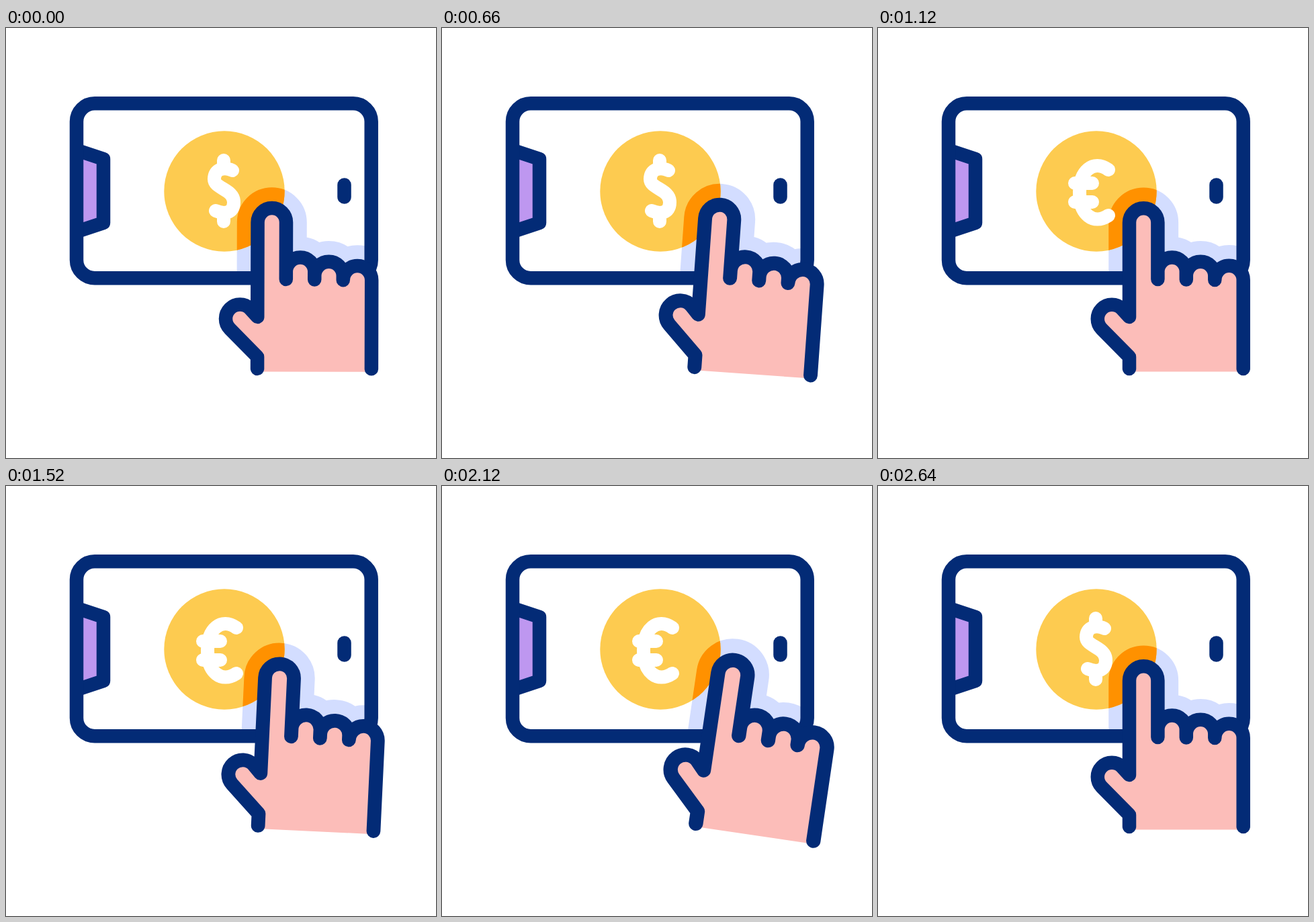
An HTML page for the animation above (3.62 s loop, 640x640 px).

```html
<!DOCTYPE html>
<html lang="en">
<head>
<meta charset="utf-8">
<title>Currency swipe</title>
<style>
  html, body { margin: 0; width: 100%; height: 100%; overflow: hidden; background: #fff; }
  svg { display: block; width: 100vw; height: 100vh; }
  .line { fill: none; stroke: #032b76; stroke-width: 20.5; stroke-linecap: round; stroke-linejoin: round; }
  .sign { fill: none; stroke: #fff; stroke-width: 20; stroke-linecap: round; stroke-linejoin: round; }
  .shadow { stroke-width: 61.5; stroke-linecap: round; stroke-linejoin: round; }
</style>
</head>
<body>
<svg viewBox="0 0 640 640">
  <defs>
    <path id="outline" d="M374 507V489.500L333 448A21 21 0 0 1 363 418L374 430V289.500a21.200 21.200 0 0 1 42.400 0V374V362.700a21.200 21.200 0 0 1 42.400 0V374.500V369a21.200 21.200 0 0 1 42.500 0V375a21.200 21.200 0 0 1 42.400 0V507"/>
    <clipPath id="screen"><rect x="105" y="112.300" width="438.700" height="259.900" rx="27"/></clipPath>
    <clipPath id="discs">
      <circle class="dollar" r="89.700"/>
      <circle class="euro" r="89.700"/>
    </clipPath>
  </defs>

  <g clip-path="url(#screen)">
    <use class="hand shadow" href="#outline" fill="#d3ddff" stroke="#d3ddff"/>
    <g fill="#fdcb50">
      <circle class="dollar" r="89.700"/>
      <circle class="euro" r="89.700"/>
    </g>
    <g clip-path="url(#discs)">
      <use class="hand shadow" href="#outline" fill="#ff9100" stroke="#ff9100"/>
    </g>
    <path class="dollar sign" d="M12 -31C-1 -37 -15 -33 -15 -18C-15 -4 14 -3 14 16C14 34 -1 34 -13 29M-1 -46V-35M-1 45V33"/>
    <path class="euro sign" d="M18 -32C-5 -48 -25 -30 -25 2C-25 34 -5 51 18 36M-32 -12H-6M-32 16H-6"/>
  </g>

  <path class="line" style="fill:#be97f0;stroke-linecap:butt" d="M105 181.700L145 195V290L105 303.300"/>
  <path class="line" d="M503.500 233.500V251.500"/>
  <rect class="line" x="105" y="112.300" width="438.700" height="259.900" rx="27"/>

  <g class="hand">
    <path fill="#fcbdb9" d="M374 511.500V489.500L333 448A21 21 0 0 1 363 418L374 430V289.500a21.200 21.200 0 0 1 42.400 0V362.700a21.200 21.200 0 0 1 42.400 0V369a21.200 21.200 0 0 1 42.500 0V375a21.200 21.200 0 0 1 42.400 0V511.500Z"/>
    <use class="line" href="#outline"/>
  </g>
</svg>
<script>
const LOOP = 3620, SWIPE = 1500, TRAVEL = 300, TILT = 30;
const start = performance.now();
const hands = document.querySelectorAll('.hand');
const coins = ['.dollar', '.euro'].map(name => document.querySelectorAll(name));

const span = (t, from, to) => Math.min(1, Math.max(0, (t - from) / (to - from)));
const smooth = t => t * t * (3 - 2 * t);

// Cubic Bezier easing with handles (a, 0) and (b, 1), solved by bisection.
function bezier(x, a, b) {
  let lo = 0, hi = 1;
  for (let i = 0; i < 24; i++) {
    const m = (lo + hi) / 2, n = 1 - m;
    if (3 * n * n * m * a + 3 * n * m * m * b + m * m * m < x) lo = m; else hi = m;
  }
  return smooth((lo + hi) / 2);
}

const place = (parts, transform) =>
  parts.forEach(part => part.setAttribute('transform', transform));

// Offset 0 is the centre of the screen, -1 and 1 are just outside it.
const placeCoin = (parts, offset) =>
  place(parts, `translate(${325 + TRAVEL * offset} 243) rotate(${TILT * offset})`);

function draw() {
  const now = (performance.now() - start) % LOOP;
  const second = now >= SWIPE;
  const t = second ? now - SWIPE : now;

  const lift = 1 - Math.pow(1 - span(t, 0, 400), 2.7);
  const swing = lift * (1 - smooth(span(t, 478, 736)));
  place(hands, `translate(398.600 537.400) rotate(${20 * swing}) scale(${1 + 0.1 * swing}) translate(-398.600 -537.400)`);

  const [leaving, entering] = second ? [coins[1], coins[0]] : coins;
  placeCoin(leaving, -smooth(span(t, 708, 1132)));
  placeCoin(entering, 1 - bezier(span(t, 780, 1120), 0.4, 0.36));

  requestAnimationFrame(draw);
}
draw();
</script>
</body>
</html>
```
